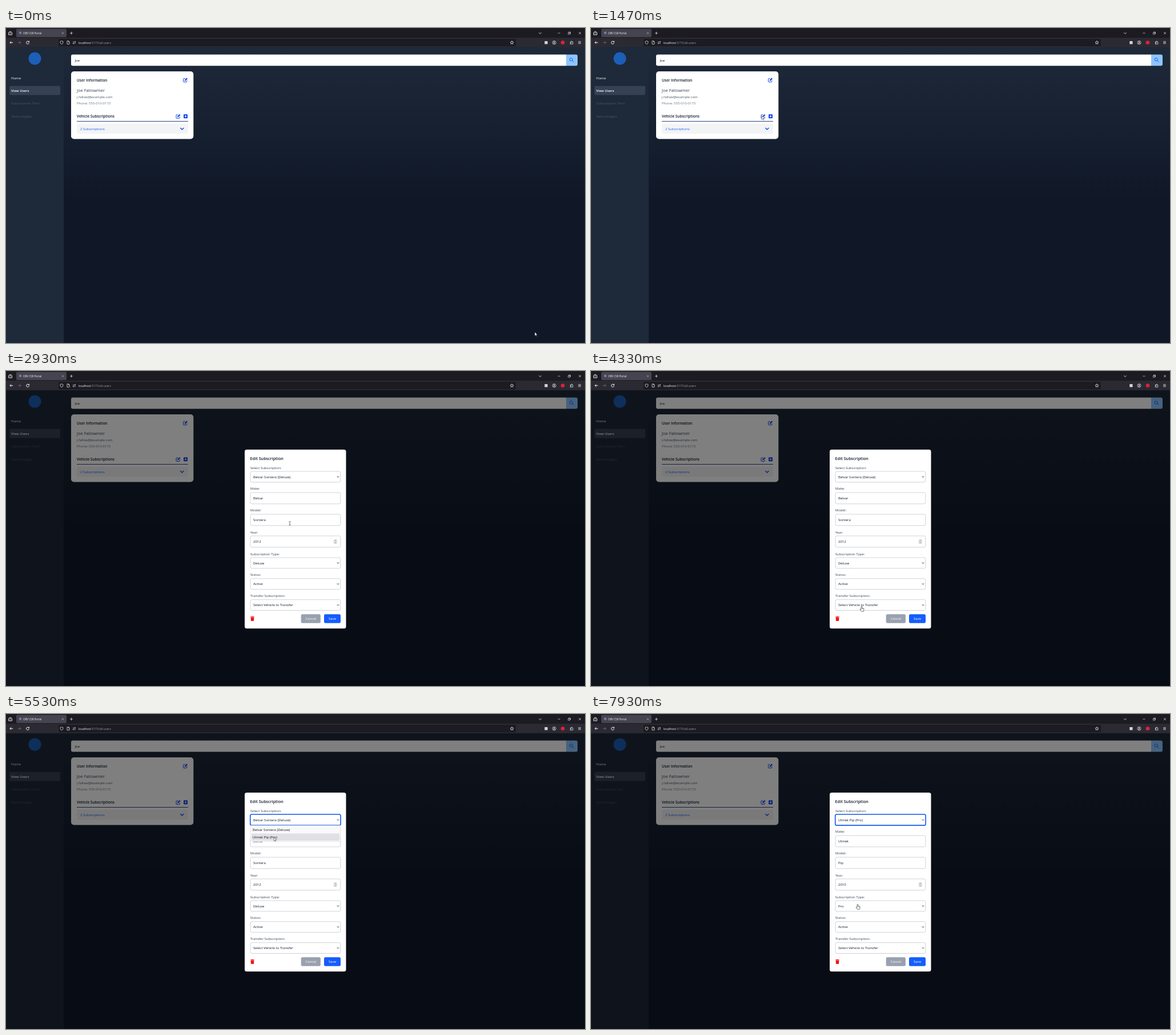
Animation of 1014 by 552 pixels, one loop 8 s. Source, as an HTML page with a canvas:

```html
<!DOCTYPE html>
<html lang="en">
<head>
<meta charset="utf-8">
<title>CSR Portal</title>
<style>
  html, body { margin: 0; width: 100%; height: 100%; overflow: hidden; background: #101828; }
  canvas { display: block; width: 1014px; height: 552px; }
</style>
</head>
<body>
<canvas id="stage"></canvas>
<script>
const W = 1014, H = 552, LOOP = 8000, STEP = 200 / 3;
const MODAL_AT = 1530, OPEN_AT = 5200, PICK_AT = 5870;
const BLUE = '#155dfc', ICON = '#1447e6', INK = '#101828', CHROME = '#fbfbfe';
const canvas = document.getElementById('stage');
const ctx = canvas.getContext('2d');
const dpr = window.devicePixelRatio || 1;
canvas.width = W * dpr;
canvas.height = H * dpr;

const vehicles = [
  { make: 'Belvar', model: 'Sontera', year: '2012', tier: 'Deluxe' },
  { make: 'Ulmek', model: 'Pip', year: '2010', tier: 'Pro' }
];
const title = v => `${v.make} ${v.model} (${v.tier})`;

// Pointer path: time, x, y
const path = [
  [0, 926, 533], [800, 309, 159], [930, 309, 159], [1070, 307, 158], [1200, 307, 158],
  [1400, 299, 154], [1740, 299, 154], [2270, 442, 206], [2470, 442, 206], [2700, 436, 183],
  [2930, 497, 267], [3070, 489, 276], [3330, 437, 203], [3730, 529, 300], [4130, 474, 416],
  [4270, 474, 416], [5130, 467, 187], [5530, 469, 216], [6070, 469, 216], [6730, 467, 334],
  [7340, 467, 334], [7400, 467.4, 334], [7870, 467.4, 334], [7930, 467, 333.6]
];

function pointerAt(time) {
  const t = Math.floor((time + 8) / STEP) * STEP;
  let i = 0;
  while (i < path.length - 1 && path[i + 1][0] <= t) i++;
  const a = path[i], b = path[i + 1] || a;
  const u = b === a ? 0 : (t - a[0]) / (b[0] - a[0]);
  const e = u * u * (3 - 2 * u);
  return { x: a[1] + (b[1] - a[1]) * e, y: a[2] + (b[2] - a[2]) * e };
}

function box(x, y, w, h, r, fill, stroke, lw = 0.7) {
  ctx.beginPath();
  ctx.roundRect(x, y, w, h, r);
  if (fill) { ctx.fillStyle = fill; ctx.fill(); }
  if (stroke) { ctx.strokeStyle = stroke; ctx.lineWidth = lw; ctx.stroke(); }
}

function dot(x, y, r, fill) {
  ctx.beginPath();
  ctx.arc(x, y, r, 0, 7);
  ctx.fillStyle = fill;
  ctx.fill();
}

// Draws SVG path data with its origin at x, y
function shape(x, y, d, stroke, lw = 0.8, fill) {
  const p = new Path2D(d);
  ctx.save();
  ctx.translate(x, y);
  ctx.lineJoin = 'round';
  if (fill) { ctx.fillStyle = fill; ctx.fill(p); }
  if (stroke) { ctx.strokeStyle = stroke; ctx.lineWidth = lw; ctx.stroke(p); }
  ctx.restore();
}

// y is the middle of the x-height band
function text(str, x, y, size, color, weight = 400, align = 'left') {
  ctx.font = `${weight} ${size}px "Open Sans", "Noto Sans", sans-serif`;
  ctx.textAlign = align;
  ctx.fillStyle = color;
  ctx.fillText(str, x, y + size * 0.36);
  return ctx.measureText(str).width;
}

function drawBrowser() {
  ctx.fillStyle = '#1c1b22';
  ctx.fillRect(0, 0, W, 17);
  ctx.fillStyle = '#2b2a33';
  ctx.fillRect(0, 17, W, 16.5);
  box(18, 1.5, 88, 14.5, 2, '#46444f');
  box(92, 19, 801, 13, 2, '#1c1b22');

  shape(7.5, 9, 'M-3 -1H3V3H-3ZM-2 -2.7H2M-1.2 1L0 2L1.2 1', CHROME, 0.8);
  box(23, 6.5, 4, 4, 0, '#6f7fa8');
  text('ORV CSR Portal', 30, 9, 4.56, CHROME);
  shape(99.5, 9, 'M-1.5 -1.5L1.5 1.5M1.5 -1.5L-1.5 1.5', '#d0d0d5', 0.6);
  shape(114.5, 9, 'M-2.4 0H2.4M0 -2.4V2.4', CHROME, 0.7);
  shape(935.5, 9, 'M-2.3 -1L0 1.2L2.3 -1', CHROME, 0.8);
  shape(968.5, 9, 'M-2 0H2', CHROME, 0.6);
  shape(986.5, 9, 'M-2 -1H1V2H-2ZM-1 -1V-2H2V1H1', CHROME, 0.6);
  shape(1005, 9, 'M-2 -2L2 2M2 -2L-2 2', CHROME, 0.6);

  const arrow = 'M2.7 0H-2.5M-0.3 -2.3L-2.6 0L-0.3 2.3';
  shape(9.5, 25.5, arrow, CHROME, 0.9);
  shape(23.5, 25.5, 'M-2.7 0H2.5M0.3 -2.3L2.6 0L0.3 2.3', '#6d6c74', 0.9);
  shape(38, 25.5, 'M2 -1.5A2.5 2.5 0 1 0 2.5 0.6M2.6 -2.8V-0.8H0.6', CHROME, 0.9);
  shape(97.5, 25.5, 'M0 -2.8L2.4 -2V0Q2.2 2 0 3Q-2.2 2 -2.4 0V-2Z', CHROME, 0.7);
  shape(109, 25.5, 'M-2 -2.7H0.7L2 -1.4V2.7H-2ZM0.5 -2.7V-1.2H2', CHROME, 0.7);
  shape(119.5, 25.5, 'M-2.5 -1.2H2.5M1.2 -2.3L2.5 -1.2L1.2 -0.2M2.5 1.4H-2.5M-1.2 0.3L-2.5 1.4L-1.2 2.5', CHROME, 0.6);
  const host = text('localhost', 127, 25.7, 5.17, CHROME);
  text(':5173/all-users', 127 + host, 25.7, 5.17, '#a09fa8');
  shape(886, 25.5, 'M0 -3L0.9 -1L3 -0.8L1.4 0.6L1.9 2.7L0 1.6L-1.9 2.7L-1.4 0.6L-3 -0.8L-0.9 -1Z', CHROME, 0.7);
  box(943.3, 23, 5.2, 5.2, 0, '#d4d4d9');
  shape(960, 25.5, 'M3 0A3 3 0 1 1 -3 0A3 3 0 1 1 3 0M-1.8 2Q0 0 1.8 2', CHROME, 0.7);
  dot(960, 24.7, 1, CHROME);
  dot(975, 25.5, 3.3, '#e0203c');
  shape(990.5, 25.5, 'M-2.3 -1H-0.7V-2.3H0.7V-1H2.3V2.6H-2.3V1.5H-1V0.2H-2.3Z', CHROME, 0.7);
  shape(1004.5, 25.5, 'M-2.3 -1.8H2.3M-2.3 0H2.3M-2.3 1.8H2.3', CHROME, 0.7);
}

function editIcon(x, y) {
  shape(x, y, 'M-0.3 -2.8H-2.5Q-3.5 -2.8 -3.5 -1.8V2.5Q-3.5 3.5 -2.5 3.5H1.8Q2.8 3.5 2.8 2.5V0.6', ICON, 1);
  shape(x, y, 'M-1.5 1.6L-1.1 -0.3L2.4 -3.9L4 -2.3L0.4 1.2Z', null, 0, ICON);
}

function drawPage(hoverRow) {
  const bg = ctx.createLinearGradient(0, 33, 0, 300);
  bg.addColorStop(0, '#1e2939');
  bg.addColorStop(1, '#101828');
  ctx.fillStyle = bg;
  ctx.fillRect(0, 33.5, W, H);
  ctx.fillStyle = '#1e2939';
  ctx.fillRect(0, 33.5, 101, H);

  dot(50.5, 53.5, 11, '#1c5fb8');
  box(6, 101.5, 89, 16, 2, '#364153');
  text('Home', 9, 88, 6, '#ffffff', 500);
  text('View Users', 9, 110, 6, '#ffffff', 600);
  text('Subscription Tiers', 9, 132.3, 6, '#4a5565');
  text('Technologies', 9, 154.5, 6, '#4a5565');

  box(114, 46.5, 867, 19.7, [3, 0, 0, 3], '#ffffff');
  box(981, 46.5, 20, 19.7, [0, 3, 3, 0], '#8ec5ff');
  shape(990.3, 55.7, 'M2 -0.6A2.6 2.6 0 1 1 -3.2 -0.6A2.6 2.6 0 1 1 2 -0.6M1.3 1.3L4.2 4.2', BLUE, 1);
  text('Joe', 120.5, 57, 6, INK);

  box(114, 76, 214.3, 118.4, 5, '#ffffff');
  text('User Information', 124, 91.5, 6.45, INK, 600);
  editIcon(314, 91.2);
  text('Joe Fallowmer', 124, 109.5, 7.5, '#364153');
  text('j.fallow@example.com', 124, 121, 6, '#4a5565');
  text('Phone: 555-010-0173', 124, 132.2, 6, '#6a7282');
  text('Vehicle Subscriptions', 124, 155, 6.45, INK, 600);
  editIcon(301.5, 154.8);
  box(311, 151.2, 7, 7, 1, ICON);
  shape(314.5, 154.7, 'M-1.9 0H1.9M0 -1.9V1.9', '#ffffff', 1);
  ctx.fillStyle = '#1c2f78';
  ctx.fillRect(124, 163, 195, 0.9);
  box(124, 168, 195, 17.3, 3, '#f3f4f6');
  const w = text('2 Subscriptions', 130, 177, 6, BLUE);
  if (hoverRow) { ctx.fillRect(130, 180, w, 0.5); }
  shape(308.3, 176.5, 'M-3 -1.5L0 1.5L3 -1.5', ICON, 1.4);
}

const BORDER = '#c3c8d0';

function field(label, labelY, y, h, value, isSelect) {
  text(label, 427.8, labelY, 6, '#364153');
  box(428, y, 157.8, h, 2.5, '#ffffff', BORDER, 0.8);
  text(value, 433, y + h / 2 + 0.1, 6, INK);
  if (isSelect) shape(581.5, y + h / 2, 'M-1.6 -0.8L0 0.9L1.6 -0.8', INK, 0.9);
}

function drawModal(t, pointer) {
  const v = vehicles[t >= PICK_AT ? 1 : 0];
  box(418, 137.7, 177.5, 313.5, 3.5, '#ffffff');
  text('Edit Subscription', 427.6, 153, 7.15, INK, 600);
  field('Select Subscription:', 169.5, 176, 18.8, title(v), true);
  field('Make:', 206.3, 213, 19.8, v.make);
  field('Model:', 244.3, 251, 19.8, v.model);
  field('Year:', 282.4, 289, 19.8, v.year);
  field('Subscription Type:', 320.4, 327, 18.8, v.tier, true);
  field('Status:', 357.2, 363.8, 18.8, 'Active', true);
  field('Transfer Subscription:', 394, 400.7, 18.8, 'Select Vehicle to Transfer', true);

  box(573.6, 294.8, 6.4, 8.2, 1, '#e4e4e7');
  shape(576.8, 299, 'M-1.3 -1.2L0 -2.4L1.3 -1.2M-1.3 1.2L0 2.4L1.3 1.2', '#55555c', 0.6);
  shape(431.5, 434, 'M-3.3 -3.8H-1.2L-0.8 -4.3H0.8L1.2 -3.8H3.3V-2.8H-3.3ZM-2.9 -2.3H2.9L2.5 4H-2.5Z', null, 0, '#fb1010');
  box(516.7, 426.3, 34.2, 15.5, 2.5, '#99a1af');
  text('Cancel', 533.8, 434.2, 6, '#ffffff', 400, 'center');
  box(557, 426.3, 29, 15.5, 2.5, BLUE);
  text('Save', 571.5, 434.2, 6, '#ffffff', 400, 'center');

  if (t >= OPEN_AT) box(427.7, 175.7, 158.4, 19.4, 2.7, null, BLUE, 1.6);
  if (t >= OPEN_AT && t < PICK_AT) {
    box(428, 195.3, 157.8, 28.3, 0, '#f9f9fb', '#cfcfd8', 0.5);
    const row = pointer.y > 209.5 ? 1 : 0;
    box(430, 197 + row * 12.5, 154, 12.5, 1, '#e0e0e6');
    vehicles.forEach((item, i) => text(title(item), 432, 203.3 + i * 12.7, 6, '#15141a'));
  }
}

const inside = (y, ranges) => ranges.some(([a, b]) => y > a && y < b);

function pointerKind(t, { x, y }) {
  const popup = t >= OPEN_AT && t < PICK_AT && y > 195;
  if (t < MODAL_AT || popup || x < 428 || x > 586) return 'arrow';
  if (inside(y, [[176, 195], [327, 346], [364, 383], [401, 420]])) return 'hand';
  return inside(y, [[213, 233], [251, 271], [289, 309]]) ? 'beam' : 'arrow';
}

function drawPointer(kind, { x, y }) {
  if (kind === 'beam') {
    shape(x, y, 'M-1.6 -3H-0.5L0 -2.6L0.5 -3H1.6M0 -2.6V2.6M-1.6 3H-0.5L0 2.6L0.5 3H1.6', '#333333', 0.7);
  } else if (kind === 'hand') {
    shape(x, y, 'M-0.9 0.3Q0 -0.8 0.8 0.3V3L3.4 3.6Q4.2 3.8 4.1 5L3.5 8.7H-0.7L-2.8 5.5Q-3 4.6 -2.2 4.5L-0.9 5.5Z', '#222222', 0.6, '#ffffff');
    shape(x, y, 'M0.8 3V5M2 3.4V5M3.1 3.6V5', '#444444', 0.4);
  } else {
    shape(x, y, 'M0 0V6.4L1.5 5L2.5 7.3L3.5 6.8L2.5 4.6H4.6Z', '#111111', 0.45, '#ffffff');
  }
}

function draw(now) {
  const t = now % LOOP;
  const pointer = pointerAt(t);
  const hover = t < MODAL_AT && pointer.x > 124 && pointer.x < 319 && pointer.y > 168 && pointer.y < 185;
  ctx.setTransform(dpr, 0, 0, dpr, 0, 0);
  drawPage(hover);
  if (t >= MODAL_AT) {
    ctx.fillStyle = 'rgba(0, 0, 0, 0.5)';
    ctx.fillRect(0, 33.5, W, H);
    drawModal(t, pointer);
  }
  drawBrowser();
  drawPointer(pointerKind(t, pointer), pointer);
}

const start = performance.now();
function tick() {
  draw(performance.now() - start);
  requestAnimationFrame(tick);
}
tick();
</script>
</body>
</html>
```
